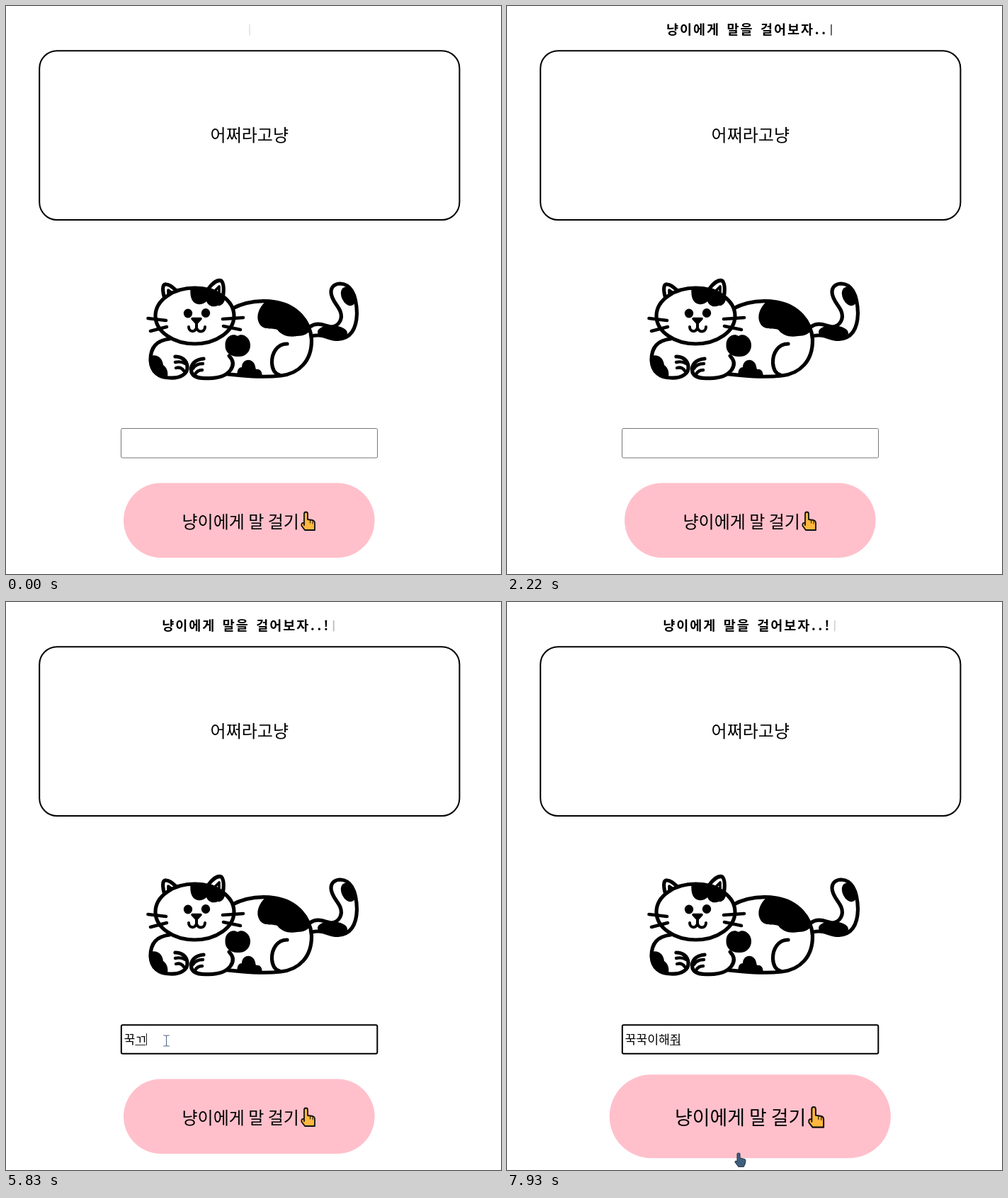
An HTML page with a canvas for the animation above (8 s loop, 699 by 802 pixels).

```html
<!DOCTYPE html>
<html lang="ko">
<head>
<meta charset="utf-8">
<title>냥이에게 말 걸기</title>
<style>
html, body { margin: 0; width: 100%; height: 100%; overflow: hidden; background: #fff; }
canvas { display: block; }
</style>
</head>
<body>
<canvas id="stage" width="699" height="802"></canvas>
<script>
const ctx = document.getElementById('stage').getContext('2d');
const LOOP = 8000;
const KR = '"Noto Sans CJK KR", "Noto Sans KR", "Noto Sans CJK", sans-serif';
const MONO = '"Noto Sans Mono CJK KR", ' + KR;

const clamp = x => Math.max(0, Math.min(1, x));
const span = (t, a, b) => clamp((t - a) / (b - a));
const mix = (a, b, k) => a + (b - a) * k;
const smooth = k => k * k * (3 - 2 * k);

// CSS "ease": cubic-bezier(.25, .1, .25, 1)
function ease(x) {
  let lo = 0, hi = 1, s = 0.5;
  for (let i = 0; i < 20; i++) {
    s = (lo + hi) / 2;
    const bx = 0.75 * s * (1 - s) + s ** 3;
    if (bx < x) lo = s; else hi = s;
  }
  return 0.3 * s * (1 - s) ** 2 + 3 * s * s * (1 - s) + s ** 3;
}

function shape(d, fill, stroke, width) {
  const p = new Path2D(d);
  if (fill) { ctx.fillStyle = fill; ctx.fill(p); }
  if (stroke) { ctx.strokeStyle = stroke; ctx.lineWidth = width; ctx.stroke(p); }
}

function oval(x, y, rx, ry, fill, width = 0, turn = 0) {
  ctx.beginPath();
  ctx.ellipse(x, y, rx, ry, turn, 0, 7);
  ctx.fillStyle = fill;
  ctx.fill();
  if (width) { ctx.strokeStyle = '#000'; ctx.lineWidth = width; ctx.stroke(); }
}

function box(x, y, w, h, r, fill, stroke, width) {
  ctx.beginPath();
  ctx.roundRect(x, y, w, h, r);
  if (fill) { ctx.fillStyle = fill; ctx.fill(); }
  if (stroke) { ctx.strokeStyle = stroke; ctx.lineWidth = width; ctx.stroke(); }
}

function label(text, x, y, font, align = 'left') {
  ctx.font = font;
  ctx.textAlign = align;
  ctx.fillStyle = '#000';
  ctx.fillText(text, x, y);
}

const TITLE = '냥이에게 말을 걸어보자..!';
const CELL = 19;
const cellWidth = c => /[가-힣]/.test(c) ? CELL : CELL / 2;

function drawTitle(t) {
  const count = Math.max(0, Math.floor((t - 310) / 144) + 1);
  const shown = [...TITLE].slice(0, count);
  const width = shown.reduce((sum, c) => sum + cellWidth(c), 0);
  let x = 338 - width / 2;
  for (const c of shown) {
    label(c, x + cellWidth(c) / 2, 40, `700 18.5px ${MONO}`, 'center');
    x += cellWidth(c);
  }
  const phase = ((t + 55) % 1030) / 515;
  ctx.globalAlpha = phase < 1 ? ease(phase) : 1 - ease(phase - 1);
  ctx.fillStyle = '#222';
  ctx.fillRect(x + 5, 26, 1.9, 15.5);
  ctx.globalAlpha = 1;
}

function drawCat() {
  const W = 5.2;
  ctx.lineCap = ctx.lineJoin = 'round';

  // tail
  const tail = 'M429 453C441 445 450 452 459 453C471 452 476 441 472 431C469 423 459 415 459 404C459 396 465 392 472 392C490 393 495 414 495.500 434C495 455 488 469 469 470.500C455 471 449 462 432 466';
  shape(tail, '#fff');
  ctx.save();
  ctx.clip(new Path2D(tail));
  oval(483, 410, 9, 14, '#000', 0, -0.45);
  oval(461, 461, 21, 10, '#000', 0, 0.05);
  ctx.restore();
  shape(tail, null, '#000', W);

  // body
  const body = 'M318 428C340 416 361 415 381 418C411 423 430 446 431.500 471C432 501 414 519 388 522C360 525 334 522 306 519L250 480Z';
  shape(body, '#fff');
  ctx.save();
  ctx.clip(new Path2D(body));
  shape('M369 415C359 423 352 436 357 447C362 459 376 454 383 457C390 466 400 468 411 466C420 466 427 463 431 456L420 425L385 410Z', '#000');
  shape('M327 525C325 514 329 510 333 510C333 501 342 497 348 502C352 505 352 510 353 513C359 512 363 517 361 525Z', '#000');
  ctx.restore();
  shape('M318 428C340 416 361 415 381 418C411 423 430 446 431.500 471C432 501 414 519 388 522C360 525 334 522 306 519', null, '#000', W);
  shape('M397 477C383 477 375 490 375.500 504C376 513 380 519 386 521', null, '#000', W);
  shape('M327 466C334 461 345 468 345 479C345 489 337 496 327 495C316 495 309 488 309.500 479C309 467 320 461 327 466Z', '#000');

  // front paws
  const left = 'M231 470C211 472 204 484 204 500C205 517 216 525 231 525C247 526 257 519 256 509C255 500 248 495 239 495';
  shape(left, '#fff');
  ctx.save();
  ctx.clip(new Path2D(left));
  shape('M203 494C214 491 221 497 222 507C228 511 230 519 227 527L202 527Z', '#000');
  ctx.restore();
  shape(left, null, '#000', W);
  shape('M239 503Q247 501 253 505M240 511Q247 509 251 515', null, '#000', 4.4);
  const right = 'M279 498C267 499 261 506 261.500 514C262 524 272 526 284 525.500C299 526 311 522 317 514C322 507 321 500 315 494';
  shape(right, '#fff');
  shape(right, null, '#000', W);
  shape('M278 505Q268 505 264 512M277 514Q270 514 267 520', null, '#000', 4.4);

  // ears
  shape('M224 413C221 403 220 392 226 393C232 393 237 399 243 404', '#fff', '#000', W);
  shape('M229 408L229 401L236 406', null, '#000', 3.6);
  shape('M286 399C292 391 299 386 304 388C308 392 308 401 306 413', '#fff', '#000', W);
  shape('M295 402L301 396L301 407', null, '#000', 3.6);

  // head
  oval(266.5, 437.5, 55.5, 39.5, '#fff');
  ctx.save();
  ctx.beginPath();
  ctx.ellipse(266.5, 437.5, 55.5, 39.5, 0, 0, 7);
  ctx.clip();
  shape('M261 394C259 408 261 419 271 421C277 422 281 419 283 417C286 424 293 426 299 423C304 424 309 420 310 410L296 394Z', '#000');
  ctx.restore();
  ctx.beginPath();
  ctx.ellipse(266.5, 437.5, 55.5, 39.5, 0, 0, 7);
  ctx.lineWidth = W;
  ctx.strokeStyle = '#000';
  ctx.stroke();

  // face
  oval(257, 434, 6.2, 6.5, '#000');
  oval(282, 433.5, 6.2, 6.5, '#000');
  shape('M263 441.500L275 441.500L269 448Z', '#000', '#000', 3.5);
  shape('M269 448L269 454M258 453C258 460 267 462 269 454C271 462 281 461 281 453', null, '#000', 4);
  shape('M200.500 441L226 444M204 459L227 453M306 442L335 440M307 452L331 457', null, '#000', 4.6);
}

function drawHand() {
  shape('M421 733L421 717Q421 714.500 423.500 714.500Q426 714.500 426 717L426 725L433 726Q436 727 436 730L436 740L422 740L417.500 734Q416.500 729 421 730Z', '#ffb73d', '#111', 1.8);
  shape('M429.500 726L429.500 730M433 727L433 731', null, '#111', 1);
}

function drawButton(scale) {
  ctx.save();
  ctx.translate(343.4, 726.4);
  ctx.scale(scale, scale);
  ctx.translate(-343.4, -726.4);
  box(166, 673.6, 354.6, 105.4, 52.7, '#ffc0cb');
  label('냥이에게 말 걸기', 248.5, 737, `500 24px ${KR}`);
  drawHand();
  ctx.restore();
}

const KEYS = [
  [4700, 'ㄲ'], [5250, '꾸'], [5460, '꾹'], [5760, '꾹ㄲ'], [6030, '꾹꾸'],
  [6240, '꾹꾹'], [6380, '꾹꾹ㅇ'], [6520, '꾹꾹이'], [6730, '꾹꾹이ㅎ'],
  [6940, '꾹꾹이해'], [7290, '꾹꾹이해ㅈ'], [7360, '꾹꾹이해주'], [7420, '꾹꾹이해줘']
];
const CLICK = 4140;

function drawInput(t) {
  const focused = t >= CLICK;
  if (!focused) {
    box(162.5, 596.5, 362, 41.5, 2, '#fff', '#767676', 1);
    return;
  }
  box(162.8, 597.2, 361.5, 40.6, 2, '#fff', '#000', 2);
  const [since, text] = KEYS.filter(k => k[0] <= t).pop() || [CLICK, ''];
  const font = `300 17.25px ${KR}`;
  label(text, 166.5, 624, font);
  const end = 166.5 + ctx.measureText(text).width;
  ctx.fillStyle = '#222';
  if (text) {
    const last = ctx.measureText(text.slice(-1)).width;
    ctx.fillRect(end - last, 625, last - 1, 1);
  }
  if ((t - since) % 1000 < 500) ctx.fillRect(Math.round(end - 0.5), 609, 1, 17);
}

function drawPointer(t) {
  if (t < 3680) return;
  const come = smooth(span(t, 3620, 4080));
  const leave = smooth(span(t, 7480, 7910));
  const x = mix(mix(94, 226.5, come), 327, leave);
  const y = mix(mix(760, 619.5, come), 779, leave);
  if (t >= CLICK && t < 4370) oval(x, y, 14, 14, '#fffb80');

  ctx.save();
  ctx.translate(x, y);
  if (x > 162 && y > 596 && y < 639) {
    shape('M-4 -7.500L-1 -7.500L0 -6.500L1 -7.500L4 -7.500M0 -6.500L0 6.500M-4 7.500L-1 7.500L0 6.500L1 7.500L4 7.500', null, t < 4370 ? '#777' : '#5a6f92', 1.1);
  } else if (leave > 0 && y > 673) {
    shape('M-2 11L-2 1Q-2 -1 0 -1Q2 -1 2 1L2 6L8 7.500Q10 8 10 10L9 15L7 18.500L0 18.500L-5 12Q-5 9 -2 11Z', '#405f7d', '#26394f', 1.1);
  } else {
    shape('M0 0L0 16L4 12.500L7 18.500L9.500 17.500L6.500 11.500L11.500 11Z', '#fff', '#222', 1);
  }
  ctx.restore();
}

function draw(t) {
  ctx.fillStyle = '#fff';
  ctx.fillRect(0, 0, 699, 802);
  drawTitle(t);
  box(47.2, 63.2, 593.2, 238.8, 25, '#fff', '#000', 2);
  label('어쩌라고냥', 343.8, 191, `500 24px ${KR}`, 'center');
  drawCat();
  drawInput(t);
  drawButton(1 + 0.12 * ease(span(t, 7660, 7860)));
  drawPointer(t);
}

const start = performance.now();
function tick() {
  draw((performance.now() - start) % LOOP);
  requestAnimationFrame(tick);
}
tick();
</script>
</body>
</html>
```
